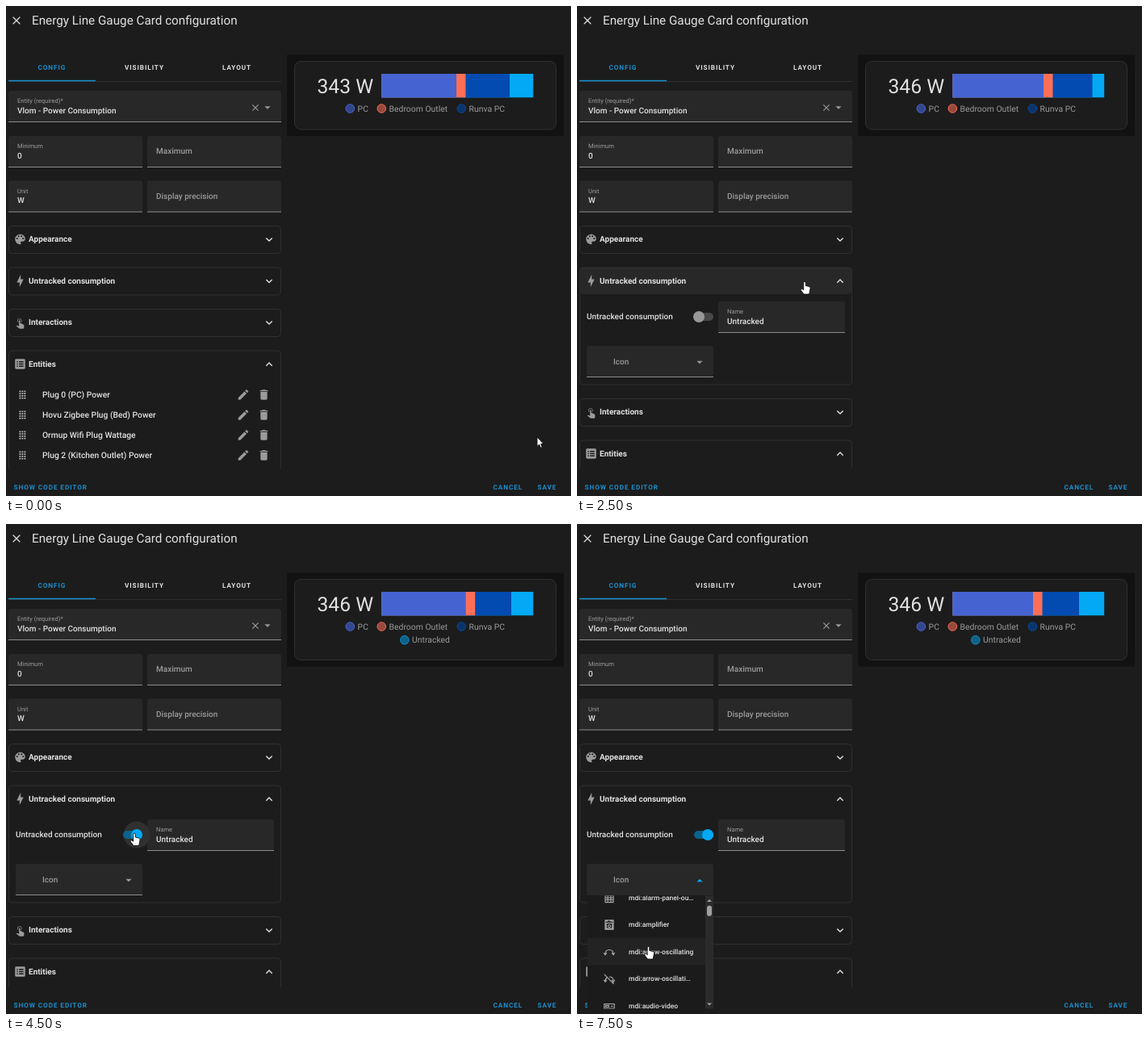
An HTML page for the animation above (8000 ms loop, 700 by 607 pixels).

```html
<!DOCTYPE html>
<html lang="en">
<head>
<meta charset="utf-8">
<title>Gauge card configuration</title>
<style>
  html, body { margin: 0; width: 100%; height: 100%; overflow: hidden; background: #1c1c1c; }
  svg { display: block; width: 100vw; height: 100vh; font-family: Roboto, "Noto Sans", sans-serif; text-rendering: geometricPrecision; }
</style>
</head>
<body>
<svg id="stage" viewBox="0 0 700 607"></svg>
<script>
const LOOP = 8000, STEP = 500;
const BG = '#1c1c1c', FIELD = '#282828', BORDER = '#303030', TEXT = '#e1e1e1', DIM = '#9b9b9b', BLUE = '#03a9f4', LINK = '#1a8fcf';
const SCALE = 0.695;

const ICONS = {
  close: 'M19,6.41L17.59,5L12,10.59L6.41,5L5,6.41L10.59,12L5,17.59L6.41,19L12,13.41L17.59,19L19,17.59L13.41,12Z',
  pencil: 'M20.71,7.04C21.1,6.65 21.1,6 20.71,5.63L18.37,3.29C18,2.9 17.35,2.9 16.96,3.29L15.12,5.12L18.87,8.87M3,17.25V21H6.75L17.81,9.93L14.06,6.18Z',
  bin: 'M19,4H15.5L14.5,3H9.5L8.5,4H5V6H19M6,19A2,2 0 0,0 8,21H16A2,2 0 0,0 18,19V7H6Z',
  down: 'M7.41,8.58L12,13.17L16.59,8.58L18,10L12,16L6,10Z',
  up: 'M7.41,15.42L12,10.83L16.59,15.42L18,14L12,8L6,14Z',
  palette: 'M12,3A9,9 0 0,0 12,21A1.5,1.5 0 0,0 13.1,18.5A1.5,1.5 0 0,1 14.2,16H16A5,5 0 0,0 21,11C21,6.6 17,3 12,3Z',
  bolt: 'M11,15H6L13,1V9H18L11,23Z',
  tap: 'M10,9A1,1 0 0,1 12,9V13.5L13.2,13.6L18.2,15.8Q19,16.3 19,17.1V21.5Q18.9,22.9 17.5,23H11L5.1,18.4L5.8,17.6Q6.3,17.1 6.8,17.3L10,19ZM11,5A4,4 0 0,1 13,12.5V11.2A3,3 0 1,0 9,11.2V12.5A4,4 0 0,1 11,5Z',
  list: 'M5,3H19Q21,3 21,5V19Q21,21 19,21H5Q3,21 3,19V5Q3,3 5,3ZM6,7V9H8V7ZM10,7V9H18V7ZM6,11V13H8V11ZM10,11V13H18V11ZM6,15V17H8V15ZM10,15V17H18V15Z',
  hand: 'M-1.3,1.2Q-1.3,0 0,0Q1.3,0 1.3,1.2V5L5.5,6Q7.2,6.4 7.1,8L6.3,12.5L5.5,15.5H-1L-4.6,10.6Q-5.2,9.3 -4.2,8.7Q-3.2,8.4 -1.3,10.2Z',
  arrow: 'M0,0V11.5L2.6,9.2L4.4,13.2L6.3,12.4L4.6,8.5H8Z'
};

const wave = y => `M9,${y}q2.5,-2.5 5,0t5,0`;
const box = 'M4,3H20V21H4Z';
const OPTIONS = [
  ['account-plus', 'M8,20V18C8,13.5 22,13.5 22,18V20ZM15,5A3,3 0 1,0 15,11A3,3 0 1,0 15,5M5,7V15M1,11H9'],
  ['air-conditioner', 'M12,6Q6,0 5,5Q6,8 12,6Q18,0 19,5Q18,8 12,6Q4,10 8,12Q11,12 12,6Q20,10 16,12Q13,12 12,6'],
  ['air-filter', 'M5,3V21M2,6H5M2,12H5M2,18H5' + [5, 10, 15, 20].map(wave).join('') + 'M19,3V21'],
  ['air-humidifier', 'M19,9V5Q19,3 17,3H5Q3,3 3,5V19Q3,21 5,21H17Q19,21 19,19M11,8Q5,15 11,16Q17,15 11,8M22,12V16'],
  ['air-humidifier-off', 'M19,9V3H3V21H19M11,8Q5,15 11,16Q17,15 11,8M2,2L22,22'],
  ['air-purifier', box + 'M8,7H16M8,11H16M12,15V18'],
  ['air-purifier-off', box + 'M8,7H16M8,11H16M2,2L22,22'],
  ['alarm-bell', 'M5,18V11Q5,4 12,4Q19,4 19,11V18ZM10,21H14'],
  ['alarm-light', 'M6,20V12Q6,7 12,7Q18,7 18,12V20ZM4,21H20M12,1V4M3,4L5,6M21,4L19,6'],
  ['alarm-light-ou…', 'M6,20V12Q6,7 12,7Q18,7 18,12V20M4,21H20M12,1V4'],
  ['alarm-panel', box + 'M7,7H17M8,12H16M8,16H16'],
  ['alarm-panel-ou…', box + 'M4,8H20M4,12H20M4,16H20M9,8V21M15,8V21'],
  ['amplifier', box + 'M5,4.5H9M13,4.5H19M5,8.5H19M6,10V20M18,10V20M7,19.5H17M12,12A2.5,2.5 0 1,0 12,17A2.5,2.5 0 1,0 12,12'],
  ['arrow-oscillating', 'M4,17Q4,8 12,8Q20,8 20,17M1,14L4,18L7,14M17,14L20,18L23,14'],
  ['arrow-oscillati…', 'M4,17Q4,11 8,9M12,8Q20,8 20,15M1,14L4,18L7,14M17,14L20,18L23,14M2,3L21,22'],
  ['audio-video', 'M2,8H22V17H2ZM5,11H11V14H5ZM15,12.5H19']
];

const rect = (x, y, w, h, fill, rx = 0, stroke = 'none') =>
  `<rect x="${x}" y="${y}" width="${w}" height="${h}" rx="${rx}" fill="${fill}" stroke="${stroke}"/>`;
const circle = (x, y, r, fill, stroke = 'none') =>
  `<circle cx="${x}" cy="${y}" r="${r}" fill="${fill}" stroke="${stroke}"/>`;
const text = (x, y, s, size = 10, fill = TEXT, weight = 400, extra = '') =>
  `<text x="${x}" y="${y}" font-size="${size}" fill="${fill}" font-weight="${weight}" ${extra}>${s}</text>`;
const caps = (x, y, s, fill = TEXT) => text(x, y, s, 8.2, fill, 700, 'letter-spacing=".92"');
const icon = (name, cx, cy, fill = DIM, k = SCALE) =>
  `<path transform="translate(${cx - 12 * k} ${cy - 12 * k}) scale(${k})" d="${ICONS[name]}" fill="${fill}" fill-rule="evenodd"/>`;
const caret = (x, y, dir = 1, fill = DIM, w = 3.6) =>
  `<path d="M${x - w},${y - dir * w / 2}h${2 * w}l${-w},${dir * w}z" fill="${fill}"/>`;

function field(x, y, w, label, value, line = '#8c8c8c') {
  const body = value === undefined
    ? text(x + 11, y + 22, label, 10, DIM, 500)
    : text(x + 11, y + 15, label, 7.55, DIM) + text(x + 11, y + 27.5, value, 10, TEXT, 500);
  return rect(x, y, w, 39, FIELD, 3) + rect(x, y + 38, w, 1, line) + body;
}

function panel(y, h, name, title, open) {
  return rect(3.5, y + .5, 337, h, 'none', 4, BORDER) + icon(name, 17.5, y + 17) +
    text(28, y + 20.3, title, 10, TEXT, 700) + icon(open ? 'up' : 'down', 326, y + 17.3, TEXT);
}

function entityRow(y, name) {
  let dots = '';
  for (let i = 0; i < 12; i++) dots += rect(16.5 + i % 3 * 3, y - 5 + Math.floor(i / 3) * 2.8, 1.8, 1.7, '#c0c0c0');
  return dots + text(45, y + 3.6, name, 10.3, TEXT, 500) + icon('pencil', 294, y) + icon('bin', 319.5, y);
}

function toggle(s) {
  const x = s.on ? 162 : 151;
  return (s.halo ? circle(x, 385, 16.5, s.on ? '#303030' : '#272727') : '') +
    rect(145, 380, 24, 10, s.on ? '#0a638d' : '#484848', 5) + circle(x, 385, 7, s.on ? BLUE : '#989898');
}

function untracked(s) {
  return (s.highlight ? rect(4, 324, 336, 33, s.highlight, 4) : '') +
    panel(323.5, s.expanded ? 145 : 34, 'bolt', 'Untracked consumption', s.expanded) +
    (s.expanded ? text(12, 388, 'Untracked consumption', 10, TEXT, 500) +
      field(175, 366, 157, 'Name', 'Untracked') + toggle(s) +
      rect(12, 421, 157, 39, FIELD, 3) + rect(12, 459, 157, 1, s.menu ? FIELD : s.iconHover ? '#e0e0e0' : '#8c8c8c') +
      text(45, 443.5, 'Icon', 10, DIM, 500) + caret(152, 441.5, s.menu ? -1 : 1, s.menu ? BLUE : DIM) : '');
}

function preview(s) {
  const grow = s.on ? 15.5 : 0, a = s.pc, b = a + 11.5;
  const key = (x, y, name, fill, stroke) => circle(x, y, 5.3, fill, stroke) + text(x + 9.3, y + 3.5, name, 10.4, DIM);
  return rect(348, 60.5, 343, 100.5 + grow, '#121212') + rect(357.5, 68.5, 324, 84.5 + grow, BG, 8, BORDER) +
    text(385.5, 107.5, s.watts + ' W', 24.7) +
    rect(465.3, 84, 187.9, 29.3, BLUE) + rect(465.3, 84, s.cut - 465.3, 29.3, '#034bb0') +
    rect(465.3, 84, b - 465.3, 29.3, '#ff6f55') + rect(465.3, 84, a - 465.3, 29.3, '#4564d1') +
    key(426.3, 127, 'PC', '#34468c', '#4564d1') + key(465.3, 127, 'Bedroom Outlet', '#97493c', '#ef6a53') +
    key(564.3, 127, 'Runva PC', '#0b3569', '#0a469b') +
    (s.on ? key(493.8, 143.7, 'Untracked', '#0d6187', '#0a94d4') : '');
}

function menu(s) {
  const row = 33.5;
  let out = rect(13, 460.5, 156, 140, '#1b1b1b');
  OPTIONS.forEach(([name, d], i) => {
    const y = 479.5 + i * row - s.scroll;
    if (y < 440 || y > 620) return;
    if (i === s.hover) out += rect(13, y - row / 2, 146, row, '#232323');
    out += `<path transform="translate(${40 - 7.5} ${y - 7}) scale(.625)" d="${d}" fill="none" stroke="#a8a8a8" stroke-width="1.9"/>`;
    if (i === 1) out += text(33, y + 9, 'A/C', 7.5, '#a8a8a8', 700);
    out += text(64, y + 3, 'mdi:' + name, 8.5, TEXT, 500);
  });
  return `<g clip-path="url(#menuClip)">${out}</g>` + rect(159, 460.5, 10, 140, '#2b2b2b') +
    rect(161, 472 + s.scroll * .002, 6, 13, '#a0a0a0', 3) + caret(164, 466.5, -1, '#a0a0a0', 3) + caret(164, 595, 1, '#a0a0a0', 3);
}

function cursor([x, y, kind]) {
  return `<path transform="translate(${x} ${y})" d="${ICONS[kind]}" fill="#fff" stroke="#111" stroke-width=".9" stroke-linejoin="round"/>`;
}

// Piecewise linear value through [time, value] points.
function along(points, t) {
  const i = points.findIndex(p => p[0] >= t);
  if (i < 0) return points[points.length - 1][1];
  if (!i) return points[0][1];
  const [t0, v0] = points[i - 1], [t1, v1] = points[i];
  return v0 + (v1 - v0) * (t - t0) / (t1 - t0);
}

const PC = [[0, 558], [2000, 582], [3000, 574], [4000, 571], [5500, 567], [6500, 563], [7000, 565]];
const CUT = [[0, 624], [2000, 646], [3000, 631], [4000, 627], [5500, 624], [6500, 620], [7000, 622]];
const POINTER = [
  [0, 658, 534, 'arrow'], [1000, 470, 440, 'arrow'], [1500, 282, 341.5, 'hand'], [3500, 159, 383, 'hand'],
  [5000, 132, 441, 'arrow'], [6500, 88.5, 523.5, 'hand']
];

function stateAt(t) {
  return {
    watts: t < 1000 ? 343 : 346,
    pc: along(PC, t), cut: along(CUT, t),
    pointer: POINTER.filter(p => p[0] <= t).pop().slice(1),
    expanded: t >= 2500,
    highlight: t >= 2500 && t < 3500 ? '#282828' : t >= 3500 && t < 4500 ? '#252525' : '',
    halo: t >= 3500 && t < 6000,
    on: t >= 4500,
    iconHover: t >= 5000,
    menu: t >= 6000,
    scroll: along([[6500, 0], [7000, 200], [7500, 385.5]], t),
    hover: t < 6500 ? -1 : t < 7000 ? 1 : t < 7500 ? 7 : 13
  };
}

function draw(s) {
  const shift = s.expanded ? 111 : 0;
  const paletteHoles = [[-3.8, -1], [-1.7, -3.8], [1.7, -3.8], [3.8, -1]]
    .map(([x, y]) => circle(17.5 + x, 289 + y, 1.05, BG)).join('');
  const names = ['Plug 0 (PC) Power', 'Hovu Zigbee Plug (Bed) Power', 'Ormup Wifi Plug Wattage', 'Plug 2 (Kitchen Outlet) Power'];
  return `<defs><clipPath id="bodyClip"><rect width="345" height="573.5"/></clipPath>
    <clipPath id="menuClip"><rect x="13" y="460.5" width="156" height="140"/></clipPath></defs>` +
    rect(0, 0, 700, 607, BG) +
    icon('close', 13, 18, TEXT) + text(32, 23, 'Energy Line Gauge Card configuration', 15.25) +
    caps(39.5, 79.3, 'CONFIG', LINK) + caps(147, 79.3, 'VISIBILITY') + caps(268, 79.3, 'LAYOUT') +
    rect(3, 93, 338, 1, '#303030') + rect(3, 91.8, 108, 1.5, LINK) +
    field(3, 105, 338, 'Entity (required)*', 'Vlom - Power Consumption') +
    icon('close', 309, 126, DIM, .58) + caret(324, 126) +
    field(3, 161, 166, 'Minimum', '0') + field(175, 161, 166, 'Maximum') +
    field(3, 216.5, 166, 'Unit', 'W') + field(175, 216.5, 166, 'Display precision') +
    panel(272, 34, 'palette', 'Appearance') + paletteHoles + untracked(s) +
    `<g clip-path="url(#bodyClip)"><g transform="translate(0 ${shift})">` +
    panel(375, 34, 'tap', 'Interactions') + panel(426.5, 170, 'list', 'Entities', true) +
    names.map((n, i) => entityRow(481.5 + 25 * i, n)).join('') + '</g></g>' +
    caps(9.5, 599.3, 'SHOW CODE EDITOR', LINK) + caps(603.5, 599.3, 'CANCEL', LINK) + caps(658.5, 599.3, 'SAVE', LINK) +
    preview(s) + (s.menu ? menu(s) : '') + cursor(s.pointer);
}

const stage = document.getElementById('stage');
const start = performance.now();
let shown = -1;

function tick() {
  const t = Math.floor((performance.now() - start) % LOOP / STEP) * STEP;
  if (t !== shown) {
    stage.innerHTML = draw(stateAt(t));
    shown = t;
  }
  requestAnimationFrame(tick);
}
tick();
</script>
</body>
</html>
```
